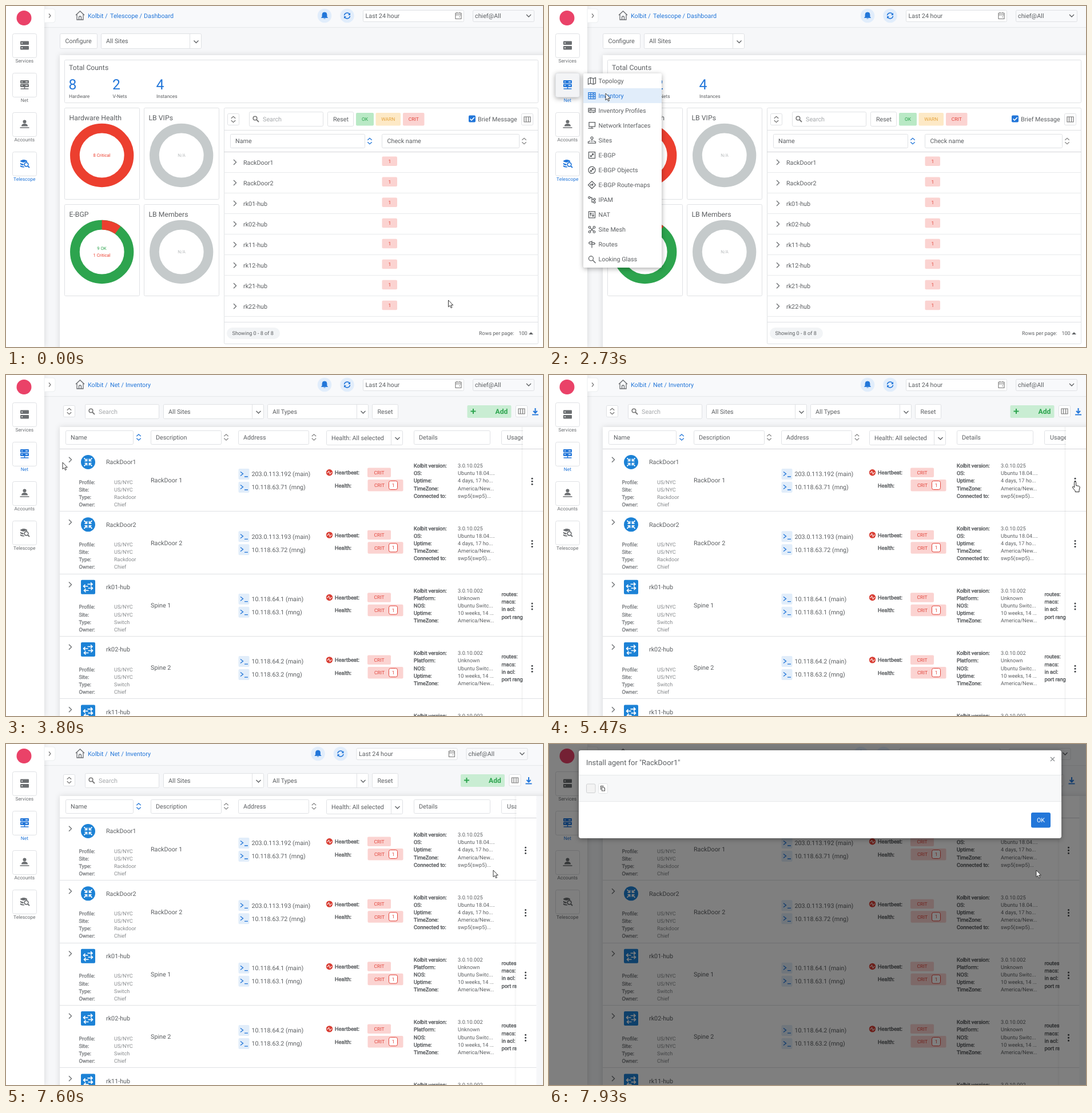
Write an HTML page that moves like this. It is 939x597 px and loops after 8 s.

```html
<!DOCTYPE html>
<html lang="en">
<head>
<meta charset="utf-8">
<title>Inventory walkthrough</title>
<style>
html, body { margin: 0; width: 100%; height: 100%; overflow: hidden; background: #f6f7f9; }
svg { display: block; width: 939px; height: 597px; font-family: Roboto, Arial, sans-serif; text-rendering: geometricPrecision; }
.drop { filter: drop-shadow(0 2px 4px #0005); }
.soft { filter: drop-shadow(0 0 5px #0002); }
</style>
</head>
<body>
<svg id="stage" viewBox="0 0 939 597"></svg>
<script>
const INK = '#5c5f62', BLUE = '#2276d9', RED = '#e2443a', GREEN = '#2da44e', EDGE = '#dfe1e4';
const LOOP = 8000, TICKS = 120;

// y is the middle of the capitals
const T = (x, y, s, size = 10.75, fill = INK, more = '') =>
  `<text x="${x}" y="${y + size * .355}" font-size="${size}" fill="${fill}" ${more}>${s}</text>`;
const C = (x, y, s, size, fill) => T(x, y, s, size, fill, 'text-anchor="middle"');
const B = (x, y, s, size = 9.2, fill = INK) => T(x, y, s, size, fill, `stroke="${fill}" stroke-width=".45"`);
const R = (x, y, w, h, fill = '#fff', stroke = 'none', r = 0, more = '') =>
  `<rect x="${x}" y="${y}" width="${w}" height="${h}" fill="${fill}" stroke="${stroke}" rx="${r}" ${more}/>`;
const P = (d, stroke = INK, w = 1.2, fill = 'none') =>
  `<path d="${d}" stroke="${stroke}" stroke-width="${w}" fill="${fill}"/>`;
const F = (d, fill = INK) => P(d, 'none', 0, fill);
const O = (x, y, r, fill = INK, stroke = 'none', w = 1) =>
  `<circle cx="${x}" cy="${y}" r="${r}" fill="${fill}" stroke="${stroke}" stroke-width="${w}"/>`;
const G = (id, body, more = '') => `<g ${id && `id="${id}"`} ${more}>${body}</g>`;
const at = (x, y, body) => G('', body, `transform="translate(${x} ${y})"`);
const H = (y, x = 94, end = 939, col = EDGE) => P(`M${x} ${y}H${end}`, col, 1);
const each = (list, f) => list.map(f).join('');

const box = (x, y, w, h, label = '', pad = 9) =>
  R(x + .5, y + .5, w - 1, h - 1, '#fff', EDGE, 2) + T(x + pad, y + h / 2, label);
const down = (x, y) => P(`M${x - 4} ${y - 2}l4 4 4-4`, INK, 1.3);
const right = (x, y) => P(`M${x - 2} ${y - 4.5}l4.5 4.5-4.5 4.5`, '#6f7275', 1.4);
const sort = (x, y, col = '#888') => P(`M${x - 3.7} ${y - 1.7}l3.7-3.5 3.7 3.5m0 3.4l-3.7 3.5-3.7-3.5`, col, 1.3);
const select = (x, y, w, h, label) => box(x, y, w, h, label) +
  P(`M${x + w - 20.5} ${y + 1}v${h - 2}`, EDGE, 1) + down(x + w - 9.5, y + h / 2 + 1);
const chip = (x, y, w, h, s, fill, ink, mid = x + w / 2) => R(x, y, w, h, fill, 'none', 2) + C(mid, y + h / 2, s, 8.45, ink);
const crit = (x, y, w, h, s, mid) => chip(x, y, w, h, s, '#fbd3d1', RED, mid);
const search = (x, y) => box(x, y, 130, 26) + O(x + 10.5, y + 11.5, 3.3, 'none', '#777', 1.6) +
  P(`M${x + 13} ${y + 14}l4 4`, '#777', 1.8) + T(x + 24, y + 13, 'Search', 10.75, '#a6a9ac');
const sortBtn = (x, y) => box(x, y, 21, 21) + sort(x + 10.5, y + 10.5, '#777');
const colsBtn = (x, y) => box(x, y, 21, 21) + P(`M${x + 5} ${y + 6}h11v9h-11zm3.5 0v9m4 0v-9`, '#777');

function frame() {
  return R(0, 0, 939, 597, '#f6f7f9') +
    G('panel', R(94, 86, 860, 530, '#fff', 'none', 0, 'class="soft"')) +
    R(0, 0, 939, 37, '#f8f9fb') + H(37.5, 67, 939, '#e6e8eb') +
    P('M122 16l7.5-7 7.5 7M124 14.5V24h11v-9.5M127.5 24v-4a2 2 0 0 1 4 0v4', '#6b6e71', 1.3) +
    T(143, 17, 'Kolbit /', 10.75, BLUE) +
    G('crumbA', T(182, 17, 'Telescope /', 10.75, BLUE) + T(241, 17, 'Dashboard', 10.75, BLUE)) +
    G('crumbB', T(182, 17, 'Net /', 10.75, BLUE) + T(209, 17, 'Inventory', 10.75, BLUE)) +
    G('', O(557, 17, 12.3, '#e1edfb') + P('M551.5 20.5l1.5-2V15a4 4 0 0 1 8 0v3.5l1.5 2zM555.5 22h3', BLUE, .8, BLUE) +
      O(596.5, 17, 12.3, '#e1edfb') + P('M591.5 16.5a5 5 0 0 1 9-2.5M601.5 17.5a5 5 0 0 1-9 2.5', BLUE, 1.5) +
      F('M602 12v4h-4zM591 22v-4h4z', BLUE) +
      box(624, 7, 177, 21, 'Last 24 hour', 4.5) + P('M786 12.5h10v10h-10zm0 3h10M788.5 11v2m5-2v2M792 19h2', '#777', 1.1) +
      R(816.5, 7.5, 107, 20, '#f8f9fb', EDGE, 2) + T(820, 17, 'chief@All') + down(914, 17), 'class="shift"');
}

const sideIcons = [
  R(-7.5, -7, 15, 6.5, 'currentColor', 'none', 1) + R(-7.5, 1.5, 15, 6.5, 'currentColor', 'none', 1) +
    P('M-5.5-3.7h2M-5.5 4.7h2', '#fff', 1.4),
  R(-7.5, -7.5, 15, 5.5, 'currentColor', 'none', 1) + R(-7.5, -1, 15, 5.5, 'currentColor', 'none', 1) +
    P('M-5.5-4.7h2M-5.5 1.7h2M1.5-4.7h4M1.5 1.7h4', '#fff') + P('M0 4v3M-7 7.5H7', 'currentColor', 1.5),
  O(0, -4, 3, 'currentColor') + F('M-5.5 4q0-4.5 5.5-4.5t5.5 4.5z', 'currentColor') + P('M-8 6.5H8', 'currentColor', 1.5),
  F('M-7.5-4.5q6-4 12 0v2q-4-1-5.5 1-4 0-6.5-2zM-7.5-1q2 2 5.5 2v2.5q-4 0-5.5-2zM-7.5 3.2q2 2 6 2l1.5 1.8q-6 0-7.5-1.5z', 'currentColor') +
    O(3, 2, 3.4, '#fff', 'currentColor', 1.6) + P('M5.5 4.5l3 3', 'currentColor', 1.8)
];
function side() {
  return R(0, 0, 67, 597, '#fff', 'none', 0, 'class="soft"') +
    P('M67 5H82a4 4 0 0 1 4 4V25a4 4 0 0 1-4 4H67z', '#eceef0', 1, '#fff') + P('M75 13.5l3 3.5-3 3.5', '#777') +
    O(31.5, 21, 13, '#ea4268') +
    each(['Services', 'Net', 'Accounts', 'Telescope'], (s, i) => {
      const y = 48 + 69 * i;
      return G('side' + i, R(11.5, y + .5, 42, 42, '#fff', EDGE, 3) + at(32.5, y + 20.5, sideIcons[i]) +
        C(32.3, y + 48.3, s, 8.45, 'currentColor'));
    });
}

function ring(x, y, title, col, part) {
  const cx = x + 65.7, cy = y + 83.5, r = 47.3;
  return R(x + .5, y + .5, 131, 160, '#fff', EDGE, 2) + T(x + 8.5, y + 17.5, title, 12.25) + O(cx, cy, r, 'none', col, 16.7) +
    (part ? P(`M${cx} ${cy - r}A${r} ${r} 0 0 1 ${cx + r * Math.sin(part)} ${cy - r * Math.cos(part)}`, '#ec3f2f', 16.7) : '');
}
function dashboard() {
  const red = '#ec3f2f', grey = '#c5cacb', names = ['RackDoor1', 'RackDoor2', ...['01', '02', '11', '12', '21', '22'].map(n => `rk${n}-hub`)];
  return box(94, 48, 66, 27, 'Configure', 9.5) + select(166, 48, 176, 27, 'All Sites') +
    R(102.5, 94.5, 828, 75, '#fff', EDGE, 2) + T(110, 107.5, 'Total Counts', 12.25) +
    each([[8, 'Hardware', 110], [2, 'V-Nets', 186.5], [4, 'Instances', 263]], ([n, s, x]) =>
      T(x - .5, 137, n, 24.8, BLUE) + T(x, 158.5, s, 8.45)) +
    ring(102, 178, 'Hardware Health', red) + C(167.5, 261.5, '8 Critical', 7.7, red) +
    ring(241, 178, 'LB VIPs', grey) + C(307, 261.5, 'N/A', 7.7, '#b8bbbd') +
    ring(102, 347, 'E-BGP', GREEN, Math.PI / 5) + C(167.5, 424.5, '9 OK', 7.7, GREEN) + C(167.5, 435.8, '1 Critical', 7.7, red) +
    ring(241, 347, 'LB Members', grey) + C(307, 430.5, 'N/A', 7.7, '#b8bbbd') +
    R(381.5, 178.5, 549, 413, '#fff', EDGE, 2) + sortBtn(387, 188) + search(425, 185) + box(562, 185, 46, 26, 'Reset', 10) +
    chip(612, 187, 31, 22.5, 'OK', '#b9e9c5', GREEN) + chip(646.5, 187, 43.5, 22.5, 'WARN', '#fde9c6', '#e5a33d') + crit(694, 187, 37.5, 22.5, 'CRIT') +
    R(809, 191.5, 12, 12, BLUE, 'none', 2) + P('M811.5 197.5l2.5 2.5 5-5', '#fff', 1.6) + T(825, 198, 'Brief Message') + colsBtn(901, 188) +
    H(217.5, 381, 931) + box(392, 224, 236, 25, 'Name') + sort(636, 236.5, BLUE) + box(657, 224, 241, 25, 'Check name', 9.5) + sort(906, 236.5) +
    H(255.5, 381, 931, '#d3d5d8') +
    each(names, (s, i) => {
      const y = 36.05 * i;
      return right(400, 273.5 + y) + T(415, 273.8 + y, s) + crit(657.5, 263.5 + y, 26.5, 16.5, '1') + H(Math.floor(291.5 + y) + .5, 381, 931, '#e8eaec');
    }) +
    H(553.5, 381, 931) + R(386, 563, 93, 20, '#f2f4f6', 'none', 10) + T(395.5, 573, 'Showing 0 - 8 of 8', 9.1) +
    T(827, 573, 'Rows per page:', 9) + T(896.5, 573, '100', 9) + F('M914 575l4-4 4 4z');
}

const soft = [['Kolbit version:', '3.0.10.025'], ['OS:', 'Ubuntu 18.04....'], ['Uptime:', '4 days, 17 ho...'], ['TimeZone:', 'America/New...'], ['Connected to:', 'swp5(swp5)...']];
const swit = [['Kolbit version:', '3.0.10.002'], ['Platform:', 'Unknown'], ['NOS:', 'Ubuntu Switc...'], ['Uptime:', '10 weeks, 14 ...'], ['TimeZone:', 'America/New...']];
const hosts = [
  ['RackDoor1', 'RackDoor 1', '203.0.113.192', '10.118.63.71'], ['RackDoor2', 'RackDoor 2', '203.0.113.193', '10.118.63.72'],
  ['rk01-hub', 'Spine 1', '10.118.64.1', '10.118.63.1'], ['rk02-hub', 'Spine 2', '10.118.64.2', '10.118.63.2'],
  ['rk11-hub', 'Leaf 11', '10.118.64.11', '10.118.63.11']];
const top0 = 129.5, pitch = 109.35;

function row([name, about, main, mng], i) {
  const gate = i < 2;
  const icon = gate
    ? O(0, 0, 12.5, '#1c82d6') + each([0, 90, 180, 270], a => G('', P('M-7-7l4.5 4.5M-2-6v4h-4', '#fff', 1.7), `transform="rotate(${a})"`))
    : R(-12.5, -12.5, 25, 25, '#1c82d6', 'none', 2) +
      P('M-1-5h8M4.500-8l3 3-3 3M-8-1.5h8M-5-4.5l-3 3 3 3M0 2h8M5-1l3 3-3 3M-7 6h8M-4 3l-3 3 3 3', '#fff', 1.6);
  return at(0, top0 + pitch * i,
    right(112, 18.8) + at(143.5, 23, icon) + T(175, 23, name) +
    each([['Profile:', 'US/NYC'], ['Site:', 'US/NYC'], ['Type:', gate ? 'Rackdoor' : 'Switch'], ['Owner:', 'Chief']], ([k, v], j) =>
      B(127.5, 58 + 13.1 * j, k, 9.1, '#85888b') + T(189, 58 + 13.1 * j, v, 9.1, '#85888b')) +
    T(253, 55, about) +
    each([main + ' (main)', mng + ' (mng)'], (s, j) => R(406.5, 34.5 + 23 * j, 19, 19, '#e1edfa', 'none', 2) +
      P(`M410 ${40 + 23 * j}l4.5 3.5-4.5 3.5m7 1.5h6`, BLUE, 1.3) + T(429.5, 44 + 23 * j, s)) +
    O(565.5, 41.3, 5.7, '#d93f35') + P('M561 41.5h2l1.5-3 2 6 1.5-3h2', '#fff', 1) +
    B(575, 41.5, 'Heartbeat:') + B(575, 64, 'Health:') + crit(632, 33, 41, 16.5, 'CRIT') + crit(632.5, 53.5, 62, 20.5, 'CRIT', 653) +
    R(669.5, 56, 15, 15, '#fff', RED, 3) + C(677, 63.5, '1', 8.45, RED) +
    each(gate ? soft : swit, ([k, v], j) => B(713, 29.5 + 13.1 * j, k) + T(790, 29.5 + 13.1 * j, v, 9.25)) +
    (gate ? '' : each(['routes:', 'macs:', 'in acl:', 'port range:'], (s, j) => B(866.5, 35.5 + 13.2 * j, s))));
}
function inventory() {
  const lines = (a, b) => each([0, 1, 2, 3, 4], i => H(Math.floor(top0 + pitch * i) + .5, a, b, i ? EDGE : '#d3d5d8'));
  return sortBtn(100, 53) + search(138, 51) + select(275, 51, 176, 26, 'All Sites') + select(457, 51, 177, 26, 'All Types') + box(640, 51, 46, 26, 'Reset', 9.5) +
    G('', R(806.5, 53, 77, 22, '#c9edd3', 'none', 2) + P('M812.5 63.5h9M817 59v9', GREEN, 2) + T(855.5, 64, 'Add', 12.1, GREEN, 'font-weight="700"') +
      colsBtn(891, 53) + P('M925.5 58v8M922 63l3.5 3.5 3.5-3.5', BLUE, 2) + P('M920 69.5h11', BLUE, 1.8), 'class="shift"') +
    box(104, 97, 119, 25, 'Name') + sort(232, 109, BLUE) + box(253, 97, 124, 25, 'Description') + sort(385, 109) +
    box(406, 97, 124, 25, 'Address') + sort(538.5, 109) + select(560, 97, 134, 26, 'Health: All selected') + box(713, 97, 134, 25, 'Details') +
    box(866, 97, 80, 25, 'Usage', 10) + lines(94, 939) + each(hosts, row) +
    G('', R(901, 91, 3, 510, '#00000008') + R(904, 91, 35, 510) + lines(904, 939) + R(939, 91, 20, 510, '#f6f7f9') +
      each([0, 1, 2, 3], i => each([-5, 0, 5], d => O(920, 186.2 + pitch * i + d, 1.5, '#3f4245'))), 'class="shift"');
}

const out = 'M-2.5 2.5l5-5M0-2.5h2.5v2.5M-2.5 0v2.5H0', square = 'M-5.5-5.5h11v11h-11z';
const dot = (x, y, r) => `M${x - r} ${y}a${r} ${r} 0 1 0 ${2 * r} 0a${r} ${r} 0 1 0 ${-2 * r} 0`;
const navItems = [
  ['Topology', 'M-6.5-4l4-1.5 5 1.5 4-1.5v10l-4 1.5-5-1.5-4 1.5zM-2.5-5.5v10M2.5-4v10'],
  ['Inventory', 'M-6-5.5h12v3.6h-12zM-6-1.9h12v3.6h-12zM-6 1.7h12v3.8h-12zM-2-5.5v11M1-3.7h3M1 0h3M1 3.6h3'],
  ['Inventory Profiles', 'M-6-4h12v3.5h-12zM-4-2.2h4M-6-.5v3h12v-3M-3 2.5v2M3 2.5v2'],
  ['Network Interfaces', 'M-5-5.5h10.5v7.5h-10.5zM0 2v3M-6.5 5h9'],
  ['Sites', dot(0, -4, 2) + 'M0-2v5M-2.5 1l-4 1.5v2.5h13v-2.5l-4-1.5'],
  ['E-BGP', square + out], ['E-BGP Objects', dot(0, 0, 6) + out],
  ['E-BGP Route-maps', 'M0-6.5l6.5 6.5-6.5 6.5-6.5-6.5zM-2.5 1.5v-2h4M0-2.5l2 2-2 2'],
  ['IPAM', dot(-4.5, -4, 1.7) + dot(4.5, -1, 1.7) + dot(4.5, 4, 1.7) + 'M-3-4h3v8h3M0-1h3'],
  ['NAT', square + 'M-2 3v-5.5M-3.5-1l1.5-2 1.5 2M2-3v5.5M.5 1l1.5 2 1.5-2'],
  ['Site Mesh', dot(-4, -4, 1.8) + dot(4, -4, 1.8) + dot(-4, 4, 1.8) + dot(4, 4, 1.8) + 'M-2.5-2.5l5 5M2.5-2.5l-5 5'],
  ['Routes', 'M0-6.5v12.5M0-4.5h-3.5l-2 2 2 2h3.5M0-3h4l1.5 1.5-1.5 1.5h-4'],
  ['Looking Glass', dot(-1.5, -1.5, 4) + 'M1.5 1.5l5 5']];
const actItems = [
  ['Edit', 'M-5.5 5.5l1-3.5 7-7 2.5 2.5-7 7zM1-3.5l2.5 2.5'],
  ['Network Interfaces', 'M-5.5 5v-6h2l1.5-3h4l1.5 3h2v6zM-2.5 5v-2M0 5v-2M2.5 5v-2'],
  ['Install Agent', 'M0-6v7M-3-2l3 3 3-3M-5.5 1.5v4h11v-4'],
  ['Delete', 'M-5-4h10M-1.5-4v-1.5h3v1.5M-4-4v9.5h8v-9.5M-1.5-1.5v5M1.5-1.5v5']];
const items = (list, x, y, step, gap) => each(list, ([s, d], i) =>
  at(x, y + step * i, P(d, 'currentColor', 1.25) + T(gap, 0, s, 10.75, 'currentColor')));

function modal() {
  return R(52, 11, 844, 154, '#fff', 'none', 4, 'class="drop"') + T(65, 32.5, 'Install agent for "RackDoor1"', 12.9) +
    P('M877 23l7 7m0-7l-7 7', '#8a8d90', 1.3) + R(52, 54, 844, 47, '#f7f8f9') + H(54.5, 52, 896, '#e6e8ea') + H(100.5, 52, 896, '#e6e8ea') +
    R(65.5, 70, 15.5, 15.5, '#f3f3f3', '#cfd1d3', 2) + R(86.5, 69.5, 16, 17, '#fff', '#e3e5e7', 2) +
    P('M90.5 80v-6.5h5M92.5 75.5h3l2 2v4.5h-5z', '#555', 1.1) +
    R(843, 120, 34, 26.5, BLUE, 'none', 3) + C(860, 133, 'OK', 10.75, '#fff');
}

const $ = id => document.getElementById(id);
$('stage').innerHTML = frame() + G('dash', dashboard()) + G('inv', inventory()) + side() +
  G('nav', R(60, 118, 137, 340, '#fff', 'none', 2, 'class="drop"') + R(60, 144, 137, 26, '#e1edfa', 'none', 0, 'id="navHot"') +
    items(navItems, 75, 131, 26.04, 11.5), `color="${INK}"`) +
  G('act', R(769, 174, 128, 80, '#fff', 'none', 2, 'class="drop"') + R(769, 214, 128, 20, '#f3f3f3', 'none', 0, 'id="actHot"') +
    items(actItems, 784, 184, 20, 14), `color="${INK}"`) +
  R(0, 0, 939, 597, '#000', 'none', 0, 'id="veil"') + G('modal', modal()) +
  G('cur', G('arrow', P('M0 0V11.8l2.7-2.4 1.9 4.2 1.9-.9-1.9-4h3.7z', '#222', .9, '#fff')) +
    G('hand', P('M-1.5 1.2a1.5 1.5 0 0 1 3 0v5.3l5 1q2 .5 1.7 2.6l-1.2 4.6v3H.2v-1.8l-4.600-5.600q-.8-2 1-2l1.900 1.600z', '#222', 1, '#fff')));
const picked = $('nav').children[3];

// cursor legs: start tick, end tick, target, easing
const smooth = p => p * p * (3 - 2 * p), glide = p => 1 - (1 - p) ** 1.7;
const legs = [[0, 12, 33, 70, smooth], [18, 26, 32, 140, smooth], [30, 36, 99, 153, smooth],
  [62, 82, 920, 187, glide, p => p ** 4], [99, 107, 852, 221, smooth]];
const clamp = v => Math.max(0, Math.min(1, v));
function cursor(n) {
  let x = 773.5, y = 515;
  for (const [a, b, tx, ty, ex, ey = ex] of legs) {
    const p = clamp((n - a) / (b - a));
    x += (tx - x) * ex(p);
    y += (ty - y) * ey(p);
  }
  return [x, y];
}
const show = (id, v) => $(id).setAttribute('opacity', +v);

function draw(n) {
  const [x, y] = cursor(n), later = n >= 42, open = n >= 114;
  const hover = later ? -1 : n >= 23 ? 1 : n >= 11 ? 0 : -1;
  for (let i = 0; i < 4; i++) {
    const g = $('side' + i), hot = i === hover;
    g.setAttribute('color', hot || i === (later ? 1 : 3) ? BLUE : '#6b6e71');
    g.firstChild.setAttribute('fill', hot ? '#f3f4f6' : '#fff');
    g.firstChild.setAttribute('class', hot ? 'drop' : '');
  }
  show('dash', !later);
  show('crumbA', !later);
  show('crumbB', later);
  $('panel').setAttribute('transform', `translate(0 ${n >= 47 ? 5 : 0})`);
  show('inv', clamp((n - 46) / 11));
  show('nav', later ? 0 : clamp((n - 22) / 4));
  show('navHot', n >= 33);
  picked.setAttribute('color', n >= 33 ? BLUE : INK);
  show('act', n >= 90 && !open);
  $('actHot').setAttribute('y', y > 214 ? 214 : 194);
  show('actHot', x < 897);
  document.querySelectorAll('.shift').forEach(g => g.setAttribute('transform', `translate(${open ? -11.5 : 0} 0)`));
  const left = 1 - clamp((n - 114) / 5);
  show('veil', (1 - left ** 3) / 2);
  show('modal', 1 - left ** 4);
  const hand = n >= 81 && !open;
  show('hand', hand);
  show('arrow', !hand);
  $('cur').setAttribute('transform', `translate(${x} ${y})`);
}
function loop() {
  const t = performance.now() % LOOP;
  draw(Math.floor((t + 6) * TICKS / LOOP) % TICKS);
  requestAnimationFrame(loop);
}
loop();
</script>
</body>
</html>
```
